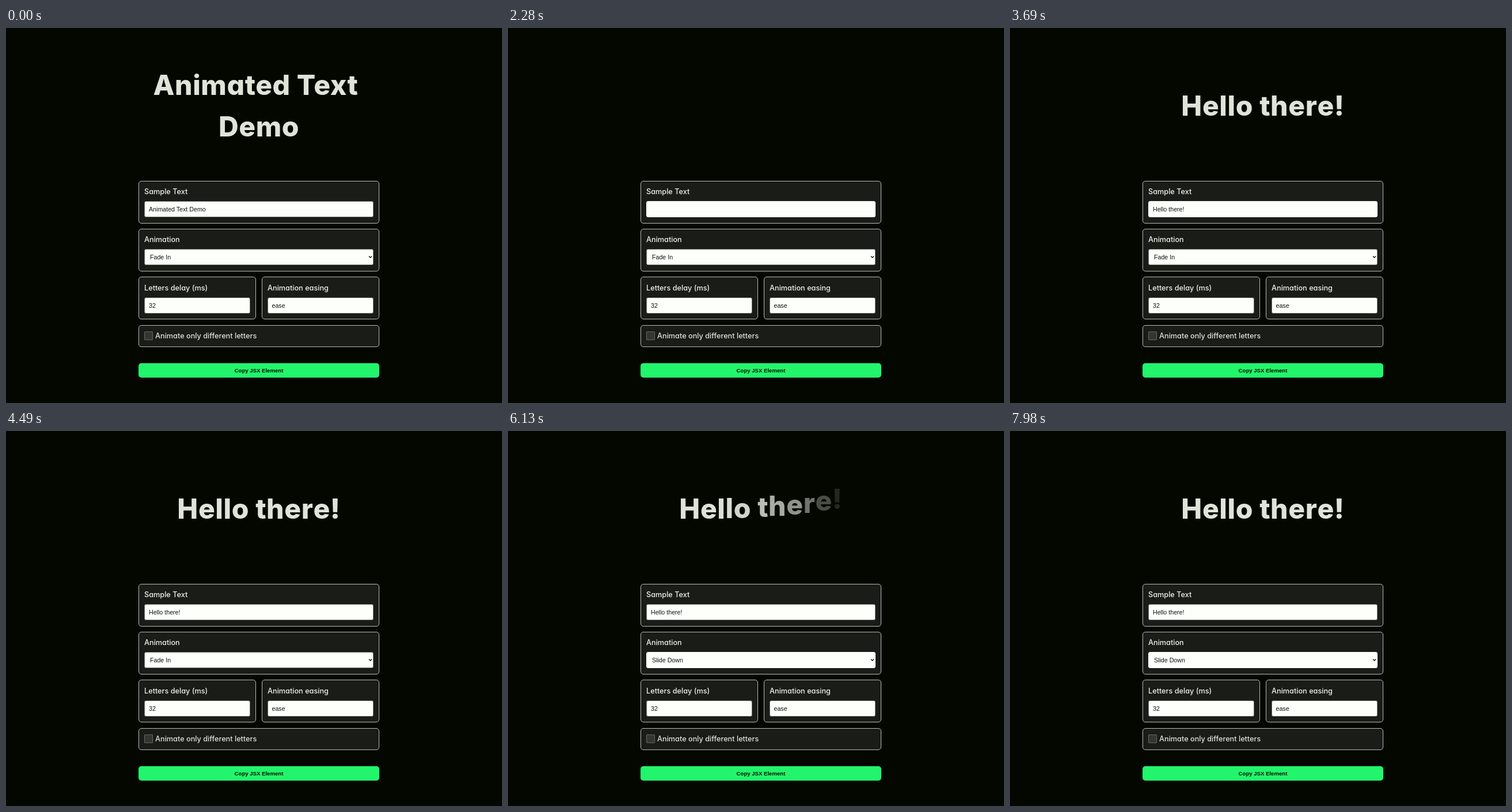
Recreate the animation shown at these times as an HTML page. Size 861 by 650 pixels, loop 8000 ms.

```html
<!DOCTYPE html>
<html lang="en">
<head>
<meta charset="utf-8">
<title>Animated Text Demo</title>
<style>
  html, body { margin: 0; width: 100%; height: 100%; overflow: hidden; background: #040700; }
  #stage { position: relative; width: 861px; height: 650px; overflow: hidden; }
  #stage > *, .field > *, .popup { position: absolute; box-sizing: border-box; }

  h1 {
    left: 230px; top: 63px; width: 418px; height: 144px; margin: 0;
    display: flex; flex-direction: column; justify-content: center;
    font: 800 48px/72px Inter, sans-serif; letter-spacing: 0.6px;
    font-feature-settings: "cv11"; text-align: center; white-space: pre; color: #dfe3d8;
  }
  h1 span { display: inline-block; }

  .panel {
    border: 1px solid #b9bdb3; border-radius: 5px; background: #1a1c18;
  }
  .label {
    font: 500 12.7px/20px Inter, sans-serif; font-feature-settings: "cv11";
    color: #f0f3ea; white-space: pre;
  }
  .field {
    height: 28px; border-radius: 3px; background: #fdfffa;
    border: 1px solid #6b6d66;
    font: 10.667px/26px "Liberation Sans", Arial, sans-serif; color: #111; white-space: pre;
  }
  .field > span { left: 7px; top: 0; }
  .field.select > span { left: 9px; }
  .field .marked { top: 6px; line-height: 13px; background: #7458c4; color: #ece8f6; }
  .caret { left: 62px; top: 6px; width: 1px; height: 13px; background: #222; }
  .field svg { left: 388px; top: 10px; }

  .popup {
    left: 241px; top: 411.5px; width: 396.5px; height: 82px; background: #fdfffc;
    font: 10.667px/13.45px "Liberation Sans", Arial, sans-serif; color: #111;
  }
  .popup div { height: 13.45px; padding-left: 9.5px; }
  .check { border: 1px solid #64675f; border-radius: 1px; background: #343731; }
  .button {
    border-radius: 5px; background: #22f56b; color: #051006; text-align: center;
    font: 700 9.6px/25px "Liberation Sans", Arial, sans-serif;
  }
</style>
</head>
<body>
<div id="stage">
  <h1 id="before"><div>Animated Text </div><div>Demo</div></h1>
  <h1 id="after"><div></div></h1>

  <div class="panel" style="left:230px;top:264.5px;width:418px;height:74px"></div>
  <div class="label" style="left:240px;top:274px">Sample Text</div>
  <div class="field" id="sample" style="left:240px;top:300px;width:398px">
    <span id="oldText">Animated Text Demo</span>
    <span id="marked" class="marked">Animated Text Demo</span>
    <span id="newText">Hello there!</span>
    <i class="caret" id="caret"></i>
  </div>

  <div class="panel" style="left:230px;top:347.5px;width:418px;height:74px"></div>
  <div class="label" style="left:240px;top:357px">Animation</div>
  <div class="field select" id="select" style="left:240px;top:383px;width:398px">
    <span id="fade">Fade In</span>
    <span id="slide">Slide Down</span>
    <svg width="7" height="6"><path d="M1 1.5 3.5 4 6 1.5" fill="none" stroke="#111" stroke-width="1.4"/></svg>
  </div>

  <div class="panel" style="left:230px;top:431px;width:204px;height:74px"></div>
  <div class="label" style="left:240px;top:440.5px">Letters delay (ms)</div>
  <div class="field" style="left:240px;top:466.5px;width:184px"><span>32</span></div>

  <div class="panel" style="left:444px;top:431px;width:204px;height:74px"></div>
  <div class="label" style="left:454px;top:440.5px">Animation easing</div>
  <div class="field" style="left:453.5px;top:466.5px;width:184.5px"><span>ease</span></div>

  <div class="panel" style="left:230px;top:514.5px;width:418px;height:38px"></div>
  <div class="check" style="left:240px;top:526px;width:15px;height:15px"></div>
  <div class="label" style="left:259px;top:523.5px;color:#dfe3d8">Animate only different letters</div>

  <div class="button" style="left:230px;top:581px;width:418px;height:25px">Copy JSX Element</div>

  <div class="popup" id="popup"></div>
</div>
<script>
  const LOOP = 8000, STAGGER = 32, DURATION = 400, SLIDE = 20;
  const FOCUS = 840, SELECT_ALL = 1110, CLEAR = 1780, PASTE = 2540, BLUR = 4000;
  const OPEN = 4530, HOVER_SECOND = 5560, HOVER_THIRD = 5630, CHOOSE = 5726;
  const BORDER = '#6b6d66', FOCUSED = '#fdfffa';
  const timing = { duration: LOOP, iterations: Infinity };
  const $ = id => document.getElementById(id);

  // Hard changes: each step is [time, value], held until the next one.
  function track(el, prop, ...steps) {
    const frames = steps.map(([time, value]) =>
      ({ offset: time / LOOP, [prop]: value, easing: 'step-end' }));
    frames.push({ offset: 1, [prop]: steps.at(-1)[1] });
    el.animate(frames, timing);
  }

  // Starts hidden and toggles at every given time.
  function toggle(el, ...times) {
    track(el, 'opacity', [0, 0], ...times.map((time, i) => [time, (i + 1) % 2]));
  }

  function addLetter(char, index) {
    const span = document.createElement('span');
    span.textContent = char;
    $('after').firstChild.append(span);
    const key = (time, opacity, y, easing = 'linear') =>
      ({ offset: time / LOOP, opacity, transform: `translateY(${y}px)`, easing });
    const fadeAt = PASTE + index * STAGGER, slideAt = CHOOSE + index * STAGGER;
    span.animate([
      key(0, 0, 0),
      key(fadeAt, 0, 0, 'ease'),
      key(fadeAt + DURATION, 1, 0),
      key(CHOOSE, 1, 0),
      key(CHOOSE, 0, -SLIDE),
      key(slideAt, 0, -SLIDE, 'ease'),
      key(slideAt + DURATION, 1, 0),
      key(LOOP, 1, 0)
    ], timing);
  }

  function addOption(name, hoverFrom, hoverTo) {
    const item = document.createElement('div');
    item.textContent = name;
    $('popup').append(item);
    if (hoverFrom === undefined) return;
    track(item, 'backgroundColor', [0, '#fdfffc'], [hoverFrom, '#9ac6f5'], [hoverTo, '#fdfffc']);
    track(item, 'color', [0, '#111'], [hoverFrom, '#3c4248'], [hoverTo, '#111']);
  }

  [...'Hello there!'].forEach(addLetter);
  addOption('Fade In', OPEN, HOVER_SECOND);
  addOption('Pop Up', HOVER_SECOND, HOVER_THIRD);
  addOption('Slide Down', HOVER_THIRD, CHOOSE);
  ['Slide Up', 'Slide Left', 'Slide Right'].forEach(name => addOption(name));

  track($('before'), 'opacity', [0, 1], [CLEAR, 0]);
  track($('oldText'), 'opacity', [0, 1], [SELECT_ALL, 0]);
  toggle($('marked'), SELECT_ALL, CLEAR);
  toggle($('newText'), PASTE);
  toggle($('caret'), FOCUS, SELECT_ALL, CLEAR, 2280, PASTE, 3140, 3720, BLUR);
  track($('caret'), 'left', [0, '107px'], [CLEAR, '7px'], [PASTE, '62px']);
  track($('sample'), 'borderColor', [0, BORDER], [FOCUS, FOCUSED], [BLUR, BORDER]);

  toggle($('popup'), OPEN, CHOOSE);
  track($('fade'), 'opacity', [0, 1], [CHOOSE, 0]);
  toggle($('slide'), CHOOSE);
  track($('select'), 'borderColor', [0, BORDER], [CHOOSE, FOCUSED]);
</script>
</body>
</html>
```
